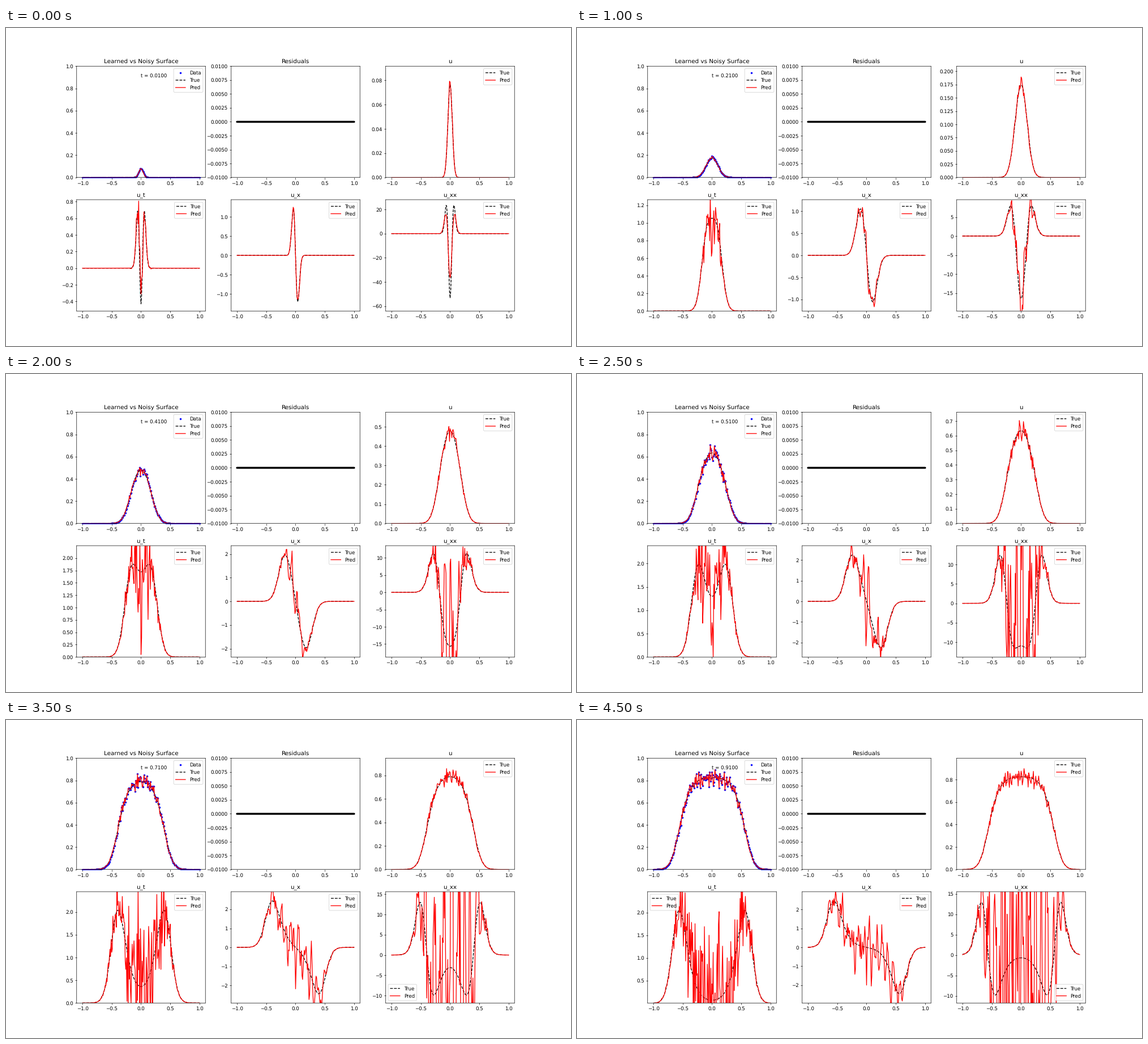
These frames come from a looping animation (998 by 561 pixels, 5000 ms). A matplotlib script:

```python
import math

import numpy as np
import matplotlib.pyplot as plt
from matplotlib.animation import FuncAnimation

plt.rcParams["font.family"] = "DejaVu Sans"
plt.rcParams["text.hinting"] = "none"
plt.rcParams["path.snap"] = False

W, H, DPI = 998, 561, 62.375
FRAMES, INTERVAL = 10, 500
DX = DT = 0.01
HALF = 5                      # half width of the local cubic fits
NOISE = 0.05                  # relative to the height of the surface


def rate(u, h):
    """Diffusion with logistic growth, no flux at the ends."""
    p = np.pad(u, 1, mode="reflect")
    return 0.02 * (p[2:] - 2 * u + p[:-2]) / h**2 + 10 * u - 12 * u**2


def simulate(steps):
    x = np.linspace(-1, 1, 401)
    h, sub = x[1] - x[0], 20
    dt = DT / sub
    u = 0.0825 * np.exp(-x**2 / 0.002)
    rows = [u[::2]]
    for _ in range(steps):
        for _ in range(sub):
            k = rate(u, h)
            u = u + dt / 2 * (k + rate(u + dt * k, h))
        rows.append(u[::2])
    return x[::2], np.array(rows)


def fit_weights(pos, order, step):
    """Weights of a cubic least squares derivative at index pos."""
    k = np.arange(2 * HALF + 1) - pos
    inv = np.linalg.pinv(np.vander(k, 4, increasing=True).astype(float))
    return inv[order] * math.factorial(order) / step**order


def fit_x(row, order):
    w = fit_weights(HALF, order, DX)
    return np.convolve(np.pad(row, HALF, mode="edge"), w[::-1], "valid")


def fit_t(n):
    start = max(0, n - HALF)
    return fit_weights(n - start, 1, DT) @ data[start:start + 2 * HALF + 1]


def second_diff(row):
    p = np.pad(row, 1, mode="reflect")
    return (p[2:] - 2 * row + p[:-2]) / DX**2


x, true = simulate(100)
rng = np.random.default_rng(7)
data = true * (1 + NOISE * rng.standard_normal(true.shape))

# the tiny margin keeps the pixel size from rounding down
fig, axes = plt.subplots(2, 3, figsize=(W / DPI + 1e-6, H / DPI + 1e-6), dpi=DPI)
surface, resid = axes[0, :2]
panels = [axes[0, 2], *axes[1]]

surface.set_title("Learned vs Noisy Surface")
dots, = surface.plot(x, data[1], "b.", label="Data")
surf_true, = surface.plot(x, true[1], "k--", label="True")
surf_pred, = surface.plot(x, data[1], "r", label="Pred")
surface.set_ylim(0, 1)
surface.legend(loc="upper right")
clock = surface.text(0, 0.9, "")

resid.set_title("Residuals")
resid.plot(x, 0 * x, "k", lw=4, solid_capstyle="round")
resid.set_ylim(-0.01, 0.01)

curves, legends = [], []
for ax, name in zip(panels, ("u", "u_t", "u_x", "u_xx")):
    ax.set_title(name)
    curves.append((ax.plot(x, 0 * x, "k--", label="True")[0],
                   ax.plot(x, 0 * x, "r", label="Pred")[0]))
    legends.append(ax.legend(loc="upper right"))


def limits(y):
    lo, hi = 1.2 * y.min(), 1.2 * y.max()
    return (0 if abs(lo) < 0.002 * (hi - lo) else lo), hi


def update(i):
    n = 10 * i + 1
    u, noisy = true[n], data[n]
    clock.set_text(f"t = {n * DT:.4f}")
    dots.set_ydata(noisy)
    surf_true.set_ydata(u)
    surf_pred.set_ydata(noisy)

    pairs = [
        (u, noisy),
        ((true[n + 1] - true[n - 1]) / (2 * DT), fit_t(n)),
        (np.gradient(u, DX), fit_x(noisy, 1)),
        (second_diff(u), fit_x(noisy, 2)),
    ]
    for ax, lines, ys in zip(panels, curves, pairs):
        for line, y in zip(lines, ys):
            line.set_ydata(y)
        ax.set_ylim(*limits(ys[0]))

    # legends jump to a clearer corner as the fronts spread
    last = i == FRAMES - 1
    legends[1].set_loc("upper left" if last else "upper right")
    legends[3].set_loc("lower right" if last else
                       "lower left" if i >= 7 else "upper right")
    return []


anim = FuncAnimation(fig, update, frames=FRAMES, interval=INTERVAL,
                     repeat=True, repeat_delay=0, blit=False)
plt.show()
```
